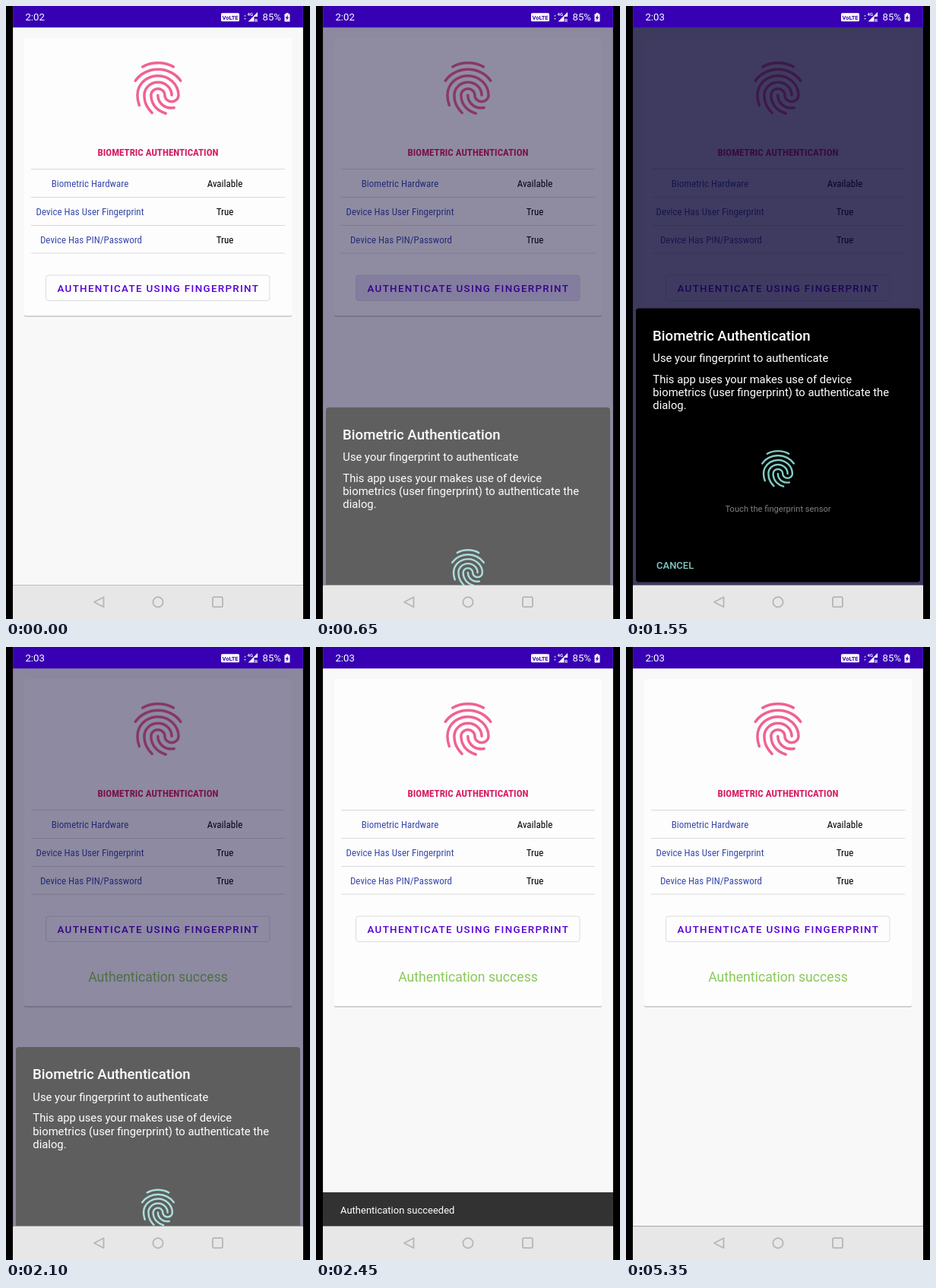
Write an HTML page that moves like this. It is 400 by 806 pixels and loops after 5400 ms.

```html
<!DOCTYPE html>
<html lang="en">
<head>
<meta charset="utf-8">
<title>Biometric authentication</title>
<style>
  html, body { margin: 0; height: 100%; overflow: hidden; background: #000; }
  svg { display: block; width: 100%; height: 100%; font-family: Roboto, sans-serif; font-size: 13px; }
  .mid { text-anchor: middle; }
  .cond { font-family: "Roboto Condensed", Roboto, sans-serif; font-stretch: 75%; text-anchor: middle; }
  .bold { font-weight: 700; }
  .medium { font-weight: 500; }
  .line { fill: none; stroke-linecap: round; }
</style>
</head>
<body>
<svg viewBox="0 0 400 806">
  <defs>
    <g id="print" class="line">
      <path d="M6.2 3.97C7.9 3 9.9 2.5 12 2.5s4 .45 5.8 1.47"/>
      <path d="M3.5 9.22C4.45 7.87 5.6 6.83 7.1 6.1c3-1.55 6.85-1.55 9.8 0 1.45.73 2.65 1.75 3.6 3.1"/>
      <path d="M9.75 21.29c-.8-.8-1.27-1.34-1.92-2.53-.65-1.15-.99-2.55-.99-4.1a5.16 4.89 0 0 1 10.32 0"/>
      <path d="M11.94 14.66c0 1.57.8 3.06 2.16 3.97.8.54 1.72.8 2.82.8.3 0 .75-.03 1.13-.1"/>
      <path d="M14.91 21.5c-1.5-.42-2.48-.96-3.5-1.97-1.3-1.3-2.02-3.03-2.02-4.87a2.58 2.44 0 0 1 5.16 0
        a2.58 2.44 0 0 0 5.16 0C19.71 10.6 16.2 7.33 11.96 7.33c-3.03 0-5.8 1.7-7.06 4.31
        c-.42.88-.64 1.9-.64 3.02 0 .95.12 2.2.7 3.78"/>
    </g>
    <clipPath id="screen"><path d="M9.1 28h381.8v734H9.1z"/></clipPath>
    <clipPath id="buttonClip"><rect x="52.5" y="354" width="294.5" height="33.5" rx="3.5"/></clipPath>
  </defs>

  <path fill="#f8f8f8" d="M9.1 0h381.8v806H9.1z"/>

  <g clip-path="url(#screen)">
    <rect id="shadow" x="24" y="43.5" width="352" rx="2" fill="#d2d2d4"/>
    <rect id="card" x="24" y="42" width="352" rx="2" fill="#fdfdfe"/>
    <use href="#print" transform="translate(158 66) scale(3.5)" stroke="#f06292"/>
    <text class="cond bold" x="200" y="197" fill="#d81b60">BIOMETRIC AUTHENTICATION</text>
    <path stroke="#d9d9db" d="M33 214.5h334M33 251.5h334M33 288.5h334M33 325h334"/>
    <g class="cond" fill="#3949ab">
      <text x="110.5" y="238">Biometric Hardware</text>
      <text x="110.5" y="275">Device Has User Fingerprint</text>
      <text x="112" y="312">Device Has PIN/Password</text>
    </g>
    <g class="cond">
      <text x="288" y="238">Available</text>
      <text x="288" y="275">True</text>
      <text x="288" y="312">True</text>
    </g>
    <circle id="ripple" cx="200" cy="371" clip-path="url(#buttonClip)" fill="#4a10c8"/>
    <rect x="52.5" y="354" width="294.5" height="33.5" rx="3.5" fill="none" stroke="#dcdcde"/>
    <text class="medium" x="67.5" y="376" font-size="13.4" letter-spacing="1.31" fill="#5600d4">AUTHENTICATE USING FINGERPRINT</text>
    <text id="success" class="mid" x="200" y="439.5" font-size="17.65" fill="#8bc85a">Authentication success</text>

    <g id="snack">
      <path fill="#323232" d="M9 717h382v45H9z"/>
      <text id="snackText" x="32" y="745" fill="#fff">Authentication succeeded</text>
    </g>

    <path id="scrim" fill="#0b0634" d="M9 28h382v734H9z"/>

    <g id="dialog" fill="#fff">
      <rect id="panel" x="13" y="397.5" width="374" height="360" rx="4"/>
      <text class="medium" x="35" y="439.5" font-size="18.65">Biometric Authentication</text>
      <g font-size="14.8">
        <text x="35.3" y="468">Use your fingerprint to authenticate</text>
        <text x="35.3" y="495.5">This app uses your makes use of device</text>
        <text x="35.3" y="513">biometrics (user fingerprint) to authenticate the</text>
        <text x="35.3" y="530">dialog.</text>
      </g>
      <use id="sensor" href="#print" transform="translate(170.6 579) scale(2.45)"/>
      <text class="mid" x="200" y="665" font-size="11.15" fill="#808080">Touch the fingerprint sensor</text>
      <text class="medium" x="40" y="740" fill="#80cbc4">CANCEL</text>
    </g>
  </g>

  <path fill="#3700b3" d="M9.1 0h381.8v28.3H9.1z"/>
  <g fill="#fff">
    <text id="clock" x="25.4" y="19.2" font-size="13.2"></text>
    <rect x="283" y="9.3" width="24" height="11" rx="1.5"/>
    <text class="mid bold" x="295" y="17.6" font-size="7.5" fill="#3700b3">VoLTE</text>
    <path opacity=".7" d="M313 13.5l1.5-2 1.5 2zM313 16l1.5 2 1.5-2z"/>
    <path d="M331 8v6h-4.5v6.5h-8z"/>
    <text class="bold" x="317.5" y="12.5" font-size="6">4G</text>
    <text class="bold" x="327.3" y="20.5" font-size="6">R</text>
    <text x="337.5" y="19.2" font-size="13.2">85%</text>
    <path d="M368.500 9h3v1.500h2v10h-7v-10h2z"/>
    <path fill="#3700b3" d="M371 11.500l-3.300 4.500h1.800l-.6 3.300 3.400-4.600h-1.900z"/>
  </g>

  <path fill="#e7e7e8" d="M9.1 761.4h381.8V806H9.1z"/>
  <g fill="none" stroke="#b6b6b8" stroke-width="1.8" stroke-linejoin="round">
    <path d="M128.500 777.200v13l-12.500-6.500z"/>
    <circle cx="200" cy="783.7" r="6.6"/>
    <rect x="272" y="777.200" width="13" height="13" rx="1.5"/>
  </g>
</svg>

<script>
const LOOP = 5400;
const el = id => document.getElementById(id);
const set = (id, attrs) => {
  for (const name in attrs) el(id).setAttribute(name, attrs[name]);
};
const part = (t, start, length) => Math.min(1, Math.max(0, (t - start) / length));

// Cubic bezier easing with control points (x1, 0) and (x2, 1).
function ease(x, x1, x2) {
  let lo = 0, hi = 1;
  for (let i = 0; i < 20; i++) {
    const s = (lo + hi) / 2, r = 1 - s;
    if (3 * r * r * s * x1 + 3 * r * s * s * x2 + s ** 3 < x) lo = s; else hi = s;
  }
  return lo * lo * (3 - 2 * lo);
}
const slowIn = x => ease(x, 0, .2);
const fastOutSlowIn = x => ease(x, .4, .2);

function draw(t) {
  const done = t >= 2000;
  el("clock").textContent = t < 1550 ? "2:02" : "2:03";

  const height = done ? 430 : 365;
  set("card", { height });
  set("shadow", { height: height + .5 });
  set("success", { opacity: +done });

  set("ripple", {
    r: 30 + 130 * part(t, 300, 225),
    opacity: .12 * part(t, 275, 75) * (1 - part(t, 650, 200))
  });

  const open = slowIn(part(t, 617.6, 250)) - slowIn(part(t, 2004, 350));
  const away = 1 - open;
  const grey = 152 * away;
  set("scrim", { opacity: .78 * Math.max(0, open) ** .55 });
  set("dialog", {
    transform: `translate(0 ${209 * away})`,
    opacity: Math.min(1, 2.6 * open)
  });
  set("panel", { fill: `rgb(${grey},${grey},${grey})` });
  set("sensor", { stroke: `rgb(${128 + 70 * away},${203 + 32 * away},${196 + 36 * away})` });

  const shown = fastOutSlowIn(part(t, 2180, 250)) - fastOutSlowIn(part(t, 5130, 250));
  set("snack", { transform: `translate(0 ${44.5 * (1 - shown)})` });
  set("snackText", { opacity: part(t, 2250, 180) - part(t, 5130, 180) });
}

function tick() {
  draw(performance.now() % LOOP);
  requestAnimationFrame(tick);
}
tick();
</script>
</body>
</html>
```
